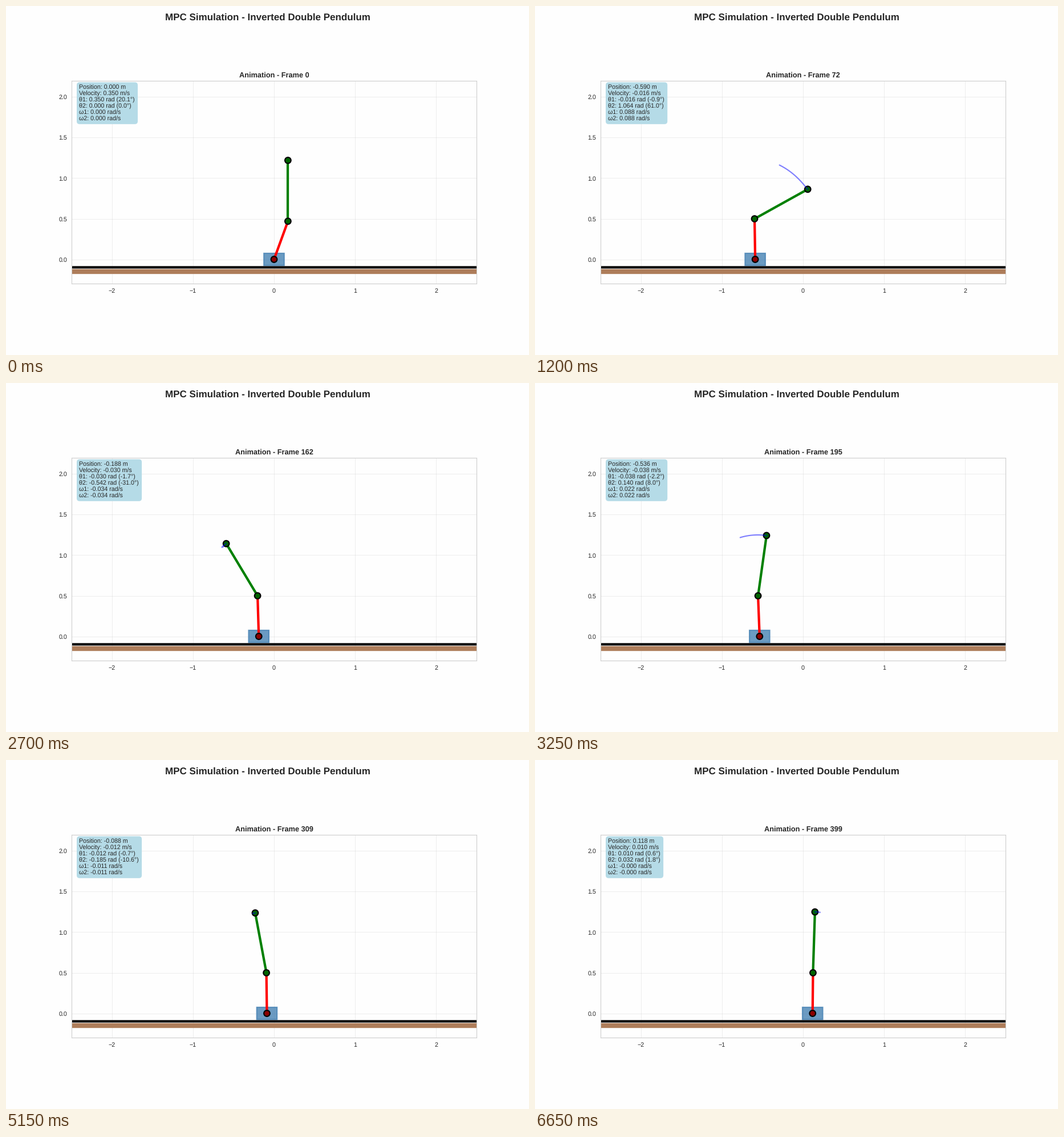
Animation, 917 px wide and 611 px high, one loop 6.7 s. Source, as a matplotlib script:

```python
import numpy as np
import matplotlib.pyplot as plt
from matplotlib.animation import FuncAnimation
from matplotlib.patches import FancyBboxPatch, Rectangle

W, H, DPI = 917, 611, 64
U = 76.4 / DPI                  # nominal point size on this canvas
STEP, COUNT, TRAIL = 3, 134, 20
DT, G = 0.05, 9.81
L1, L2 = 0.5, 0.75
TILT = 0.35                     # starting lean of both rods
INK, PAPER = "#262626", "#fefefe"

plt.rcParams["font.family"] = ["Liberation Sans", "DejaVu Sans"]
plt.rcParams["text.hinting"] = "none"


def sway(t):
    """Damped oscillation of the cart: position and three derivatives."""
    s = -0.1396 + 0.867j
    z = 2.111 * np.exp(1.111j + s * t)
    return [np.real(z * s**k) for k in range(4)]


def simulate(t):
    """Sway plus a short recovery that starts the cart at rest and tilted."""
    x0, v0, acc0, jerk0 = sway(0.0)
    x, v, acc, jerk = sway(t)
    p = 3.83
    c = TILT + acc0 / G
    b = jerk0 / G + p * c
    q, fade = c + b * t, np.exp(-p * t)
    x = x - x0 * fade * (q + 2 * b / p) / (c + 2 * b / p)
    v = v - v0 * fade * (q + b / p) / (c + b / p)
    tilt = -acc / G + q * fade
    rate = -jerk / G + (b - p * q) * fade
    return np.round([x, tilt, v, rate], 6) + 0.0


sim = simulate(np.arange(COUNT * STEP) * DT)

fig = plt.figure(figsize=(W / DPI, H / DPI), dpi=DPI, facecolor=PAPER)
fig.suptitle("MPC Simulation - Inverted Double Pendulum", x=0.5, y=0.98,
             fontsize=16 * U, fontweight="bold", color=INK)

ax = fig.add_axes([0.125, 0.11, 0.775, 0.77], facecolor=PAPER)
ax.set(xlim=(-2.5, 2.5), ylim=(-0.3, 2.2), aspect="equal",
       xticks=range(-2, 3), yticks=np.arange(0, 2.1, 0.5))
ax.set_axisbelow(True)
ax.grid(color="#cccccc", alpha=0.3, lw=U)
ax.tick_params(length=0, pad=7 * U, labelsize=10 * U, labelcolor=INK)
for spine in ax.spines.values():
    spine.set(color="#cccccc", linewidth=U)
title = ax.set_title("", fontsize=12 * U, fontweight="bold", color=INK,
                     pad=6 * U)

ax.add_patch(Rectangle((-2.5, -0.18), 5, 0.06, fc="#ae7d5a", lw=0,
                       snap=False))
ax.axhline(-0.098, color="black", lw=4 * U, snap=False)
cart = ax.add_patch(Rectangle((0, -0.075), 0.25, 0.15, fc="steelblue",
                              ec="steelblue", lw=2 * U, alpha=0.8,
                              snap=False))


def line(color, width, z, **style):
    return ax.plot([], [], color=color, lw=width * U, zorder=z, **style)[0]


lower, upper = line("red", 4, 3), line("green", 4, 3)
joints = ax.scatter([0] * 3, [0] * 3, s=(10 * U)**2, lw=2 * U, ec="black",
                    fc=["darkred", "darkgreen", "darkgreen"], zorder=4)
trail = line("blue", 2, 5, alpha=0.5, solid_capstyle="round")

# Readout panel, laid out in pixels from the top left
hud = fig.add_axes([0, 0, 1, 1], xlim=(0, W), ylim=(H, 0))
hud.axis("off")
panel = hud.add_patch(FancyBboxPatch(
    (124, 133.5), 107, 73.3, boxstyle="round,pad=0,rounding_size=5",
    fc="#b5dbe7", lw=0))
rows = [hud.text(128.5, 146 + 11 * k, "", fontsize=10 * U, color=INK,
                 va="baseline") for k in range(6)]


def tip(x, a, b):
    """Outer end of both rods at angles a and b."""
    return x + L1 * np.sin(a) + L2 * np.sin(b), L1 * np.cos(a) + L2 * np.cos(b)


def draw(i):
    n = i * STEP
    x, th1, th2, rate = sim[:, n]
    elbow = x + L1 * np.sin(th1), L1 * np.cos(th1)
    points = np.array([(x, 0), elbow, tip(x, th1, th2)])
    cart.set_x(x - 0.125)
    lower.set_data(*points[:2].T)
    upper.set_data(*points[1:].T)
    joints.set_offsets(points)

    # The trail keeps past angles but rides along with the cart
    trail.set_data(*tip(x, *sim[1:3, max(0, n - TRAIL):n + 1]))

    title.set_text(f"Animation - Frame {n}")
    readout = (f"Position: {x:.3f} m",
               f"Velocity: {th1:.3f} m/s",
               f"θ1: {th1:.3f} rad ({np.degrees(th1):.1f}°)",
               f"θ2: {th2:.3f} rad ({np.degrees(th2):.1f}°)",
               f"ω1: {rate:.3f} rad/s",
               f"ω2: {rate:.3f} rad/s")
    for row, text in zip(rows, readout):
        row.set_text(text)
    width = max(row.get_window_extent().width for row in rows)
    panel.set_width(width + 9.4)


anim = FuncAnimation(fig, draw, frames=COUNT, interval=50, repeat=True,
                     repeat_delay=0, init_func=lambda: draw(0))
plt.show()
```
